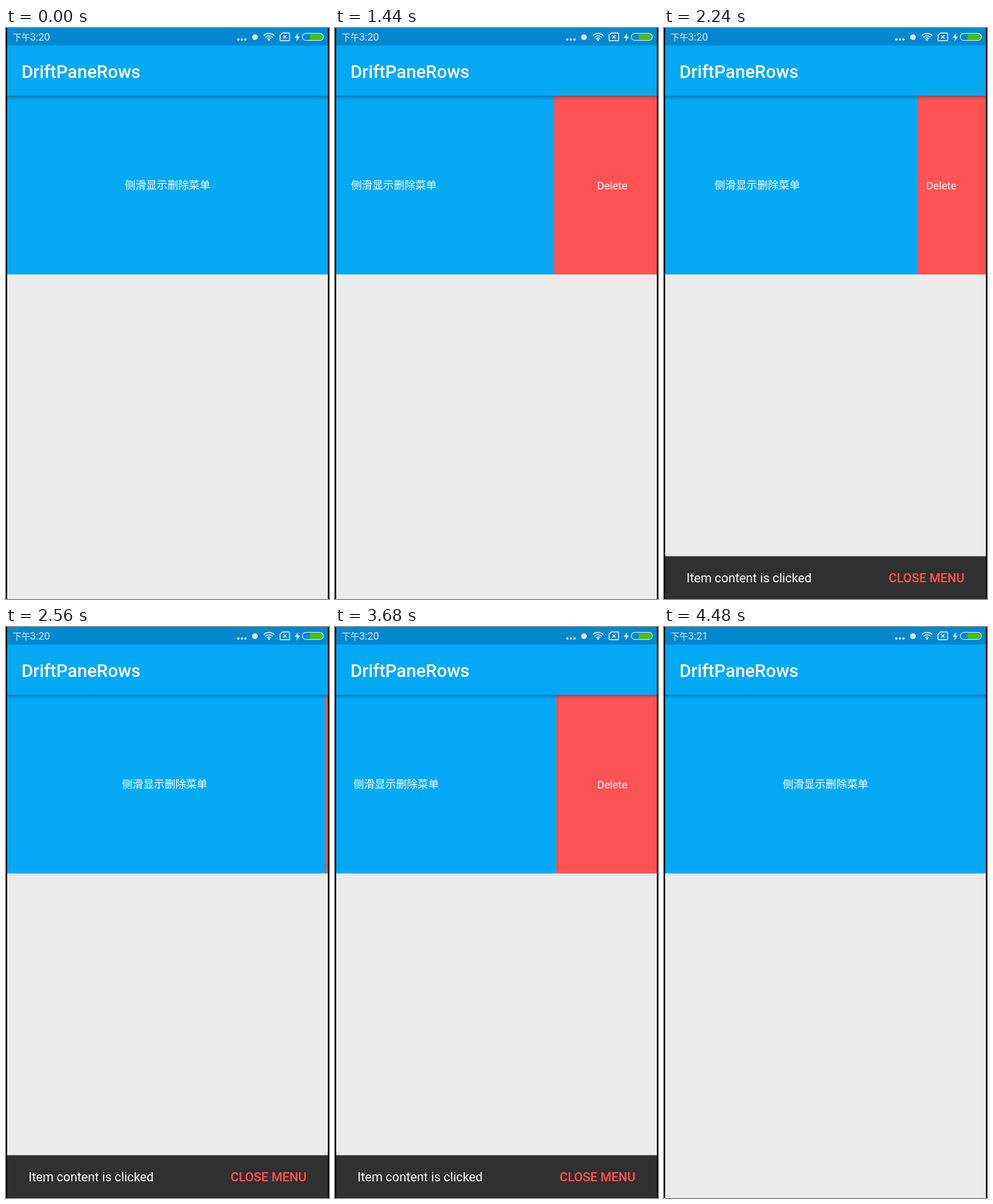
An HTML page that plays this animation: 563 by 994 pixels, repeating every 4560 ms.

```html
<!DOCTYPE html>
<html lang="zh">
<head>
<meta charset="utf-8">
<title>Swipe menu</title>
<style>
  html, body { margin: 0; width: 100%; height: 100%; overflow: hidden; background: #000; }
  svg { display: block; width: 100vw; height: 100vh; }
  text { font-family: Roboto, "Noto Sans CJK SC", "Noto Sans CJK", sans-serif; fill: #fff; }
  .mid { text-anchor: middle; font-size: 18.66px; }
  .bold { font-weight: 500; }
  .line { fill: none; stroke: #d9edf8; }
  .glyph, .clock text { fill: #d9edf8; }
</style>
</head>
<body>
<svg viewBox="0 0 563 994" preserveAspectRatio="none">
  <defs>
    <clipPath id="screen"><rect x="2" width="559" height="994"/></clipPath>
    <linearGradient id="shade" x2="0" y2="1">
      <stop offset="0" stop-color="#002b45" stop-opacity=".38"/>
      <stop offset=".45" stop-color="#002b45" stop-opacity=".14"/>
      <stop offset="1" stop-color="#002b45" stop-opacity="0"/>
    </linearGradient>
  </defs>
  <rect width="563" height="994"/>
  <g clip-path="url(#screen)">
    <rect x="2" width="559" height="994" fill="#ebebeb"/>

    <rect x="2" y="118" width="559" height="311" fill="#ff5252"/>
    <text class="mid" x="483.3" y="280.5">Delete</text>
    <g id="card">
      <rect x="2" y="118" width="559" height="311" fill="#03a9f4"/>
      <text class="mid" x="281.5" y="280" lang="zh-CN">侧滑显示删除菜单</text>
    </g>

    <rect x="2" y="118" width="559" height="8" fill="url(#shade)"/>
    <rect x="2" y="30" width="559" height="88" fill="#03a9f4"/>
    <text class="bold" x="27" y="86.5" font-size="31.1">DriftPaneRows</text>

    <rect x="2" width="559" height="30.5" fill="#0288d1"/>
    <g class="clock">
      <text x="11.5" y="21.5" font-size="15.5" lang="zh-CN">下午</text>
      <text id="clock" x="42" y="22" font-size="18">3:20</text>
    </g>
    <g class="glyph">
      <circle cx="405" cy="20" r="2.1"/>
      <circle cx="411.2" cy="20" r="2.1"/>
      <circle cx="417.4" cy="20" r="2.1"/>
      <circle cx="434" cy="16" r="5"/>
      <circle cx="458.5" cy="20.3" r="1.9"/>
      <path d="M509.5 8.5 503 17.2h4.2l-1.2 6.6 6.5-9h-4.2z"/>
    </g>
    <g class="line" stroke-width="2">
      <path d="M449.3 13.2a13.2 13.2 0 0 1 18.4 0M452.2 16.2a9 9 0 0 1 12.6 0M455 18.9a5 5 0 0 1 7 0" stroke-width="1.9"/>
      <path d="M482 8.6h11a1.3 1.3 0 0 1 1.3 1.3v11a1.3 1.3 0 0 1-1.3 1.3h-14a1.3 1.3 0 0 1-1.3-1.3v-8z" stroke-width="1.7"/>
      <path d="M483.2 12.6l5.8 5.8m0-5.8l-5.8 5.8" stroke-width="1.6"/>
    </g>
    <path d="M529.5 10.4h17.6a5.1 5.1 0 0 1 0 10.3h-17.6z" fill="#46c300"/>
    <rect class="line" x="516.5" y="9.4" width="36.6" height="12.3" rx="6.1" stroke-width="1.3"/>

    <g id="bar">
      <rect x="2" y="919.5" width="559" height="75" fill="#303030"/>
      <rect id="press" x="379" y="929" width="157" height="56" rx="2" fill="#393939"/>
      <text x="39.3" y="965" font-size="21.77">Item content is clicked</text>
      <text class="bold" x="391.5" y="965" font-size="21.77" style="fill:#ff5252">CLOSE MENU</text>
    </g>
  </g>
</svg>
<script>
const LOOP = 4560, SHUT = 561, OPEN = 405, BAR = 75;
const $ = id => document.getElementById(id);
const card = $('card'), bar = $('bar'), press = $('press'), clock = $('clock');

// Each track holds its value until the next [time, value] pair.
const edge = [
  [0, SHUT], [1120, 529], [1280, 472], [1360, 416], [1440, 382], [1520, 398], [1600, OPEN],
  [2240, 442], [2400, 502], [2480, 540], [2560, 556], [2640, SHUT],
  [3360, 526], [3440, 478], [3520, 430], [3600, 398], [3680, 386], [3760, 398], [3840, OPEN],
  [4240, 434], [4320, 502], [4400, 549], [4480, SHUT]
];
const drop = [[0, BAR], [1520, 32], [1600, 0], [4320, 22], [4400, 58], [4480, BAR]];
const glow = [[0, 0], [4080, .5], [4160, 1], [4320, .5], [4400, 0]];

const at = (track, t) => track.findLast(([start]) => start <= t)[1];
const shift = (node, x, y) => node.setAttribute('transform', `translate(${x} ${y})`);

function draw(t) {
  shift(card, at(edge, t) - SHUT, 0);
  shift(bar, 0, at(drop, t));
  bar.setAttribute('visibility', at(drop, t) < BAR ? 'visible' : 'hidden');
  press.setAttribute('opacity', at(glow, t));
  clock.textContent = t < 4480 ? '3:20' : '3:21';
}

const begin = performance.now();
function tick() {
  draw((performance.now() - begin) % LOOP);
  requestAnimationFrame(tick);
}
draw(0);
requestAnimationFrame(tick);
</script>
</body>
</html>
```
